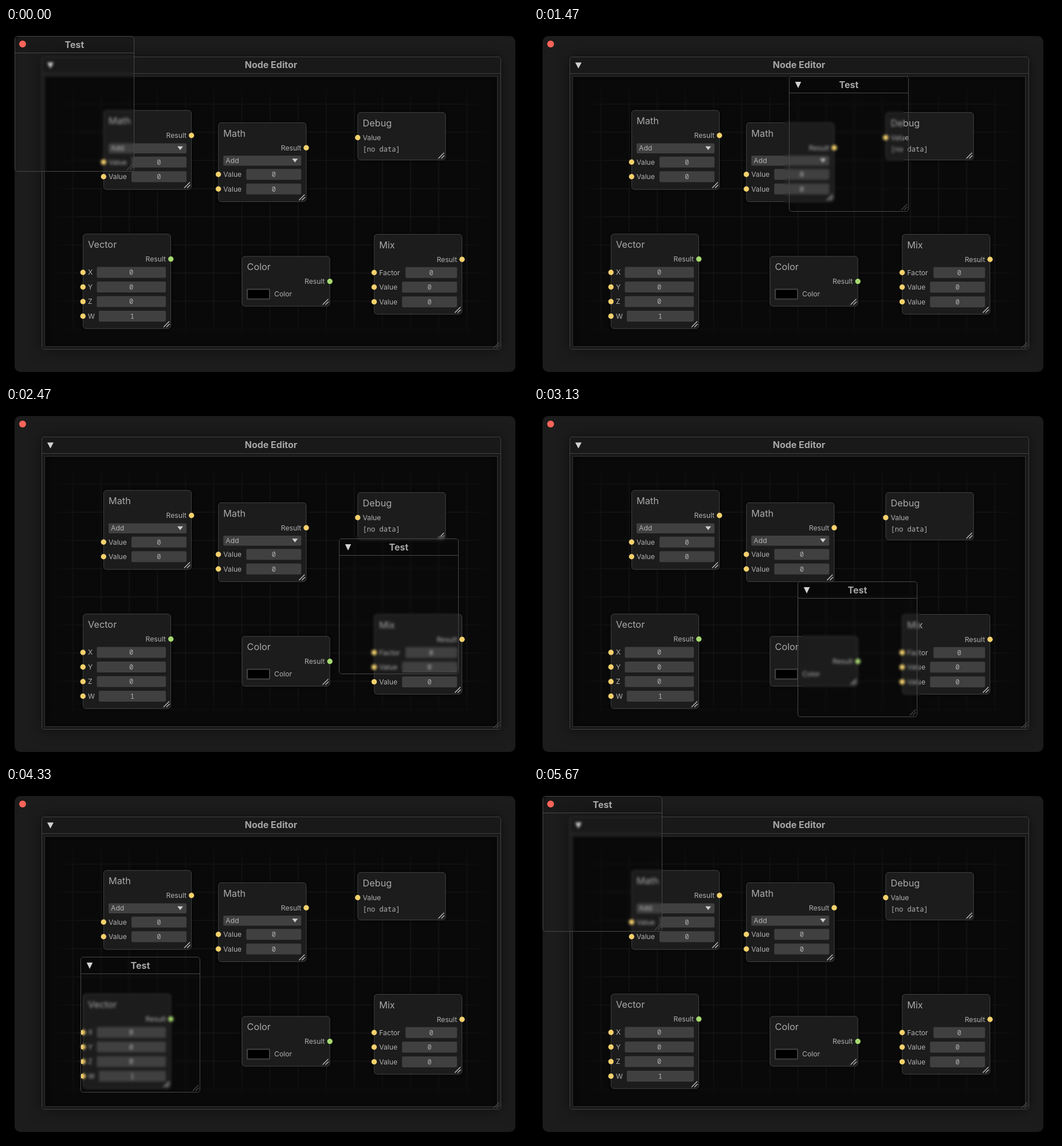
Write an HTML page that moves like this. It is 911 by 615 pixels and loops after 6.07 s.

```html
<!DOCTYPE html>
<html lang="en">
<head>
<meta charset="utf-8">
<title>Node Editor</title>
<style>
  html, body { margin: 0; width: 100%; height: 100%; overflow: hidden; background: #000; }
  #stage { position: relative; width: 911px; height: 615px; overflow: hidden; background: #000; }
  #stage div, #stage svg { position: absolute; box-sizing: border-box; }
  svg { left: 0; top: 0; overflow: visible; }
  text { font: 400 12.2px Inter, sans-serif; fill: #b0b0b0; }
  .head { font-size: 16.3px; fill: #a9a9a9; }
  .bar { font-size: 16px; font-weight: 700; fill: #a6a6a6; text-anchor: middle; }
  .mono { font-family: "Noto Sans Mono", monospace; font-size: 12.1px; }
  .mid { text-anchor: middle; }
  .end { text-anchor: end; }
  #panel { left: 15px; top: 14px; width: 874px; height: 587px; border-radius: 10px; background: #1c1c1c; }
  #editor { left: 62px; top: 50px; width: 802px; height: 512px; border: 1px solid #414141; border-radius: 5px;
    background: #191919; box-shadow: 0 0 22px rgba(0,0,0,.5); }
  #rule { left: 62px; top: 79px; width: 802px; height: 1px; background: #414141; }
  #canvas { left: 67px; top: 84px; width: 791px; height: 473px; background: #090909;
    border: 1px solid #333; box-shadow: inset 0 0 8px rgba(0,0,0,.4); }
  #grid { left: 67px; top: 84px; width: 791px; height: 473px;
    mask-image: linear-gradient(90deg, #0000 10px, #000 60px 731px, #0000 781px),
      linear-gradient(#0000 10px, #000 60px 413px, #0000 463px);
    mask-composite: intersect; }
  #blur, #test { left: 0; top: 0; width: 209px; height: 237px; border-radius: 5px; }
  #blur { backdrop-filter: blur(2px); }
  #test { border: 1px solid #484848; }
  #test svg { left: -1px; top: -1px; }
  #dot { left: 23px; top: 22px; width: 12px; height: 12px; border-radius: 50%; background: #fb6459; }
</style>
</head>
<body>
<div id="stage">
  <div id="panel"></div>
  <div id="editor"></div>
  <div id="rule"></div>
  <div id="canvas"></div>
  <div id="grid"><svg width="791" height="473"><path id="lines" stroke="#141414" stroke-width="1.7"/></svg></div>
  <svg id="nodes" width="911" height="615"></svg>
  <div id="blur"></div>
  <div id="test"><svg id="testArt" width="209" height="237"></svg></div>
  <div id="dot"></div>
</div>
<script>
const $ = id => document.getElementById(id);

// Drawing helpers: each returns SVG markup; text is placed by its vertical centre.
const text = (x, y, s, cls = '') =>
  `<text x="${x}" y="${y + (/head|bar/.test(cls) ? 6 : 4.4)}" class="${cls}">${s}</text>`;
const rect = (x, y, w, h, attrs) => `<rect x="${x}" y="${y}" width="${w}" height="${h}" ${attrs}/>`;
const tri = (x, y, w, h, fill) =>
  `<path d="M${x - w / 2} ${y - h / 2}h${w}l${-w / 2} ${h}z" fill="${fill}"/>`;
const grip = (x, y, color) =>
  `<path d="M${x - 13} ${y - 3}l10-10M${x - 8} ${y - 3}l5.5-5.5" stroke="${color}" stroke-width="1.4"/>`;
const YELLOW = '#f4d16d', GREEN = '#a6da72';
const pin = (x, y, color) => `<circle cx="${x}" cy="${y}" r="4.7" fill="${color}"/>`;

const field = (x, y, w, value) =>
  rect(x, y - 9.5, w, 19, 'rx="2" fill="#404040"') + text(x + w / 2, y, value, 'mono mid');
const input = (y, label, x, value = 0) => w =>
  pin(.3, y, YELLOW) + text(9, y, label) + field(x, y, w - 9 - x, value);
const output = color => w => text(w - 9, 44.3, 'Result', 'end') + pin(w - .3, 44.3, color);
const select = (y, label) => w =>
  rect(9, y - 8.5, w - 18, 17.5, 'rx="2" fill="#404040"') + text(13, y, label) +
  tri(w - 20, y, 10, 6.5, '#cfcfcf');

function node(x, y, w, h, title, ...parts) {
  return `<g transform="translate(${x} ${y})">` +
    rect(.5, .5, w - 1, h - 1, 'rx="5" fill="url(#face)" stroke="#414141" filter="url(#shade)"') +
    text(9, 18.5, title, 'head') + parts.map(p => p(w)).join('') + grip(w, h, '#bdbdbd') + '</g>';
}

const math = [output(YELLOW), select(66.5, 'Add'), input(90.8, 'Value', 49), input(116.3, 'Value', 49)];
$('nodes').innerHTML = `<defs>
  <linearGradient id="face" x2="0" y2="1"><stop stop-color="#1f1f1f"/><stop offset="1" stop-color="#1a1a1a"/></linearGradient>
  <filter id="shade" x="-20%" y="-20%" width="140%" height="140%">
    <feDropShadow dx="0" dy="0" stdDeviation="4" flood-color="#000" flood-opacity=".7"/></filter></defs>` +
  text(462.5, 64, 'Node Editor', 'bar') + tri(77.5, 65.5, 11, 10.5, '#d2d2d2') + grip(864, 562, '#484848') +
  node(170, 143.5, 154, 139, 'Math', ...math) +
  node(370.3, 165, 154, 139, 'Math', ...math) +
  node(613.5, 147, 154, 84, 'Debug',
    () => pin(.3, 44.5, YELLOW) + text(9, 44.5, 'Value') + text(9, 64.5, '[no data]', 'mono')) +
  node(134, 359.5, 154, 166, 'Vector', output(GREEN),
    input(67.5, 'X', 24.5), input(93, 'Y', 24.5), input(118.5, 'Z', 24.5), input(144, 'W', 28, 1)) +
  node(411.5, 398.5, 154, 88, 'Color', output(GREEN),
    () => rect(9.5, 58, 39, 17, 'rx="1" fill="#000" stroke="#424242" stroke-width="2"') + text(56.5, 66.5, 'Color')) +
  node(642.2, 360, 154, 140.5, 'Mix', output(YELLOW),
    input(67.2, 'Factor', 55), input(92.8, 'Value', 49), input(118.4, 'Value', 49));

$('testArt').innerHTML = rect(1, 1, 207, 28, 'rx="4" fill="#000" fill-opacity=".08"') +
  '<path d="M0 29.5h209" stroke="#484848"/>' + text(104.5, 14.5, 'Test', 'bar') +
  `<g id="arrow">${tri(16, 15.5, 10.5, 11, '#d2d2d2')}</g>` + grip(209, 237, '#484848');

let d = '';
for (let i = 0; i < 15; i++) d += `M${50 + i * 49.1} 0v473`;
for (let i = 0; i < 9; i++) d += `M0 ${49 + i * 49.2}h791`;
$('lines').setAttribute('d', d);

// Drag path of the floating window: time, left, top.
const PATH = [
  [0, 15, 14], [330, 46, 34], [670, 128, 63], [870, 185, 73], [1330, 364, 87], [1470, 445, 84],
  [1730, 520, 82], [2000, 555, 86], [2470, 581, 228], [2670, 587, 275], [3000, 500, 300],
  [3330, 399, 306], [3550, 345, 309], [3800, 277, 307], [4000, 196, 301], [4330, 130, 295],
  [4670, 95, 278], [4870, 80, 228], [5330, 31, 70], [5640, 15, 14]
];

// Monotone cubic interpolation through column c of PATH.
function curve(c) {
  const n = PATH.length - 1;
  const slope = i => (PATH[i + 1][c] - PATH[i][c]) / (PATH[i + 1][0] - PATH[i][0]);
  const m = PATH.map((_, i) => {
    if (i === 0 || i === n) return 0;
    const a = slope(i - 1), b = slope(i);
    return a * b <= 0 ? 0 : 2 * a * b / (a + b);
  });
  return t => {
    if (t <= 0) return PATH[0][c];
    if (t >= PATH[n][0]) return PATH[n][c];
    let i = 0;
    while (PATH[i + 1][0] < t) i++;
    const h = PATH[i + 1][0] - PATH[i][0], u = (t - PATH[i][0]) / h, v = 1 - u;
    return PATH[i][c] * v * v * (1 + 2 * u) + PATH[i + 1][c] * u * u * (3 - 2 * u) +
      h * u * v * (m[i] * v - m[i + 1] * u);
  };
}

const LOOP = 6070, STEP = 1000 / 15, LAG = 19;
const left = curve(1), top_ = curve(2);
const start = k => Math.round(k * STEP / 10) * 10;
const place = (el, t) => {
  el.style.transform = `translate(${Math.round(left(t))}px, ${Math.round(top_(t))}px)`;
};

function draw() {
  const t = performance.now() % LOOP;
  let k = Math.floor(t / STEP) + 1;
  if (start(k) > t) k--;
  const at = start(k), resting = at <= 0 || at >= 5670;
  place($('test'), at);
  place($('blur'), resting ? at : at - LAG);  // the blur trails the drag slightly
  $('arrow').style.display = resting ? 'none' : '';
  requestAnimationFrame(draw);
}
draw();
</script>
</body>
</html>
```
